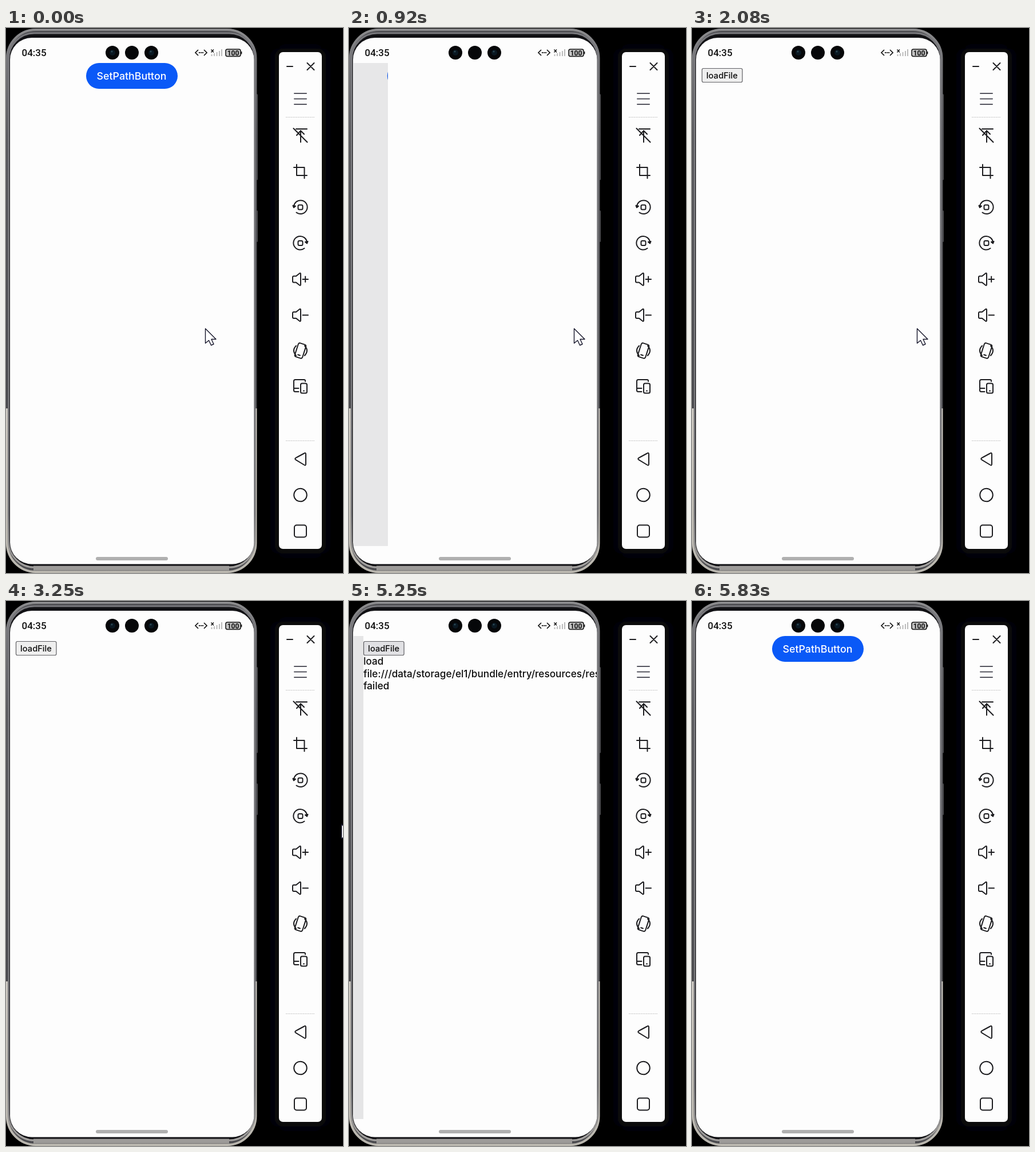
Animation, 589 px wide and 950 px high, one loop 5910 ms. Source, as an HTML page:

```html
<!DOCTYPE html>
<html lang="en">
<head>
<meta charset="utf-8">
<title>Phone page navigation</title>
<style>
  html, body { margin: 0; width: 100%; height: 100%; overflow: hidden; background: #000; }
  svg { display: block; width: 589px; height: 950px; }
  .ui { font-family: Inter, "Noto Sans", sans-serif; }
  .icons { fill: none; stroke: #1d1d20; stroke-width: 2; stroke-linejoin: round; stroke-linecap: round; }
  .status { font-family: Roboto, Inter, sans-serif; font-weight: 500; fill: #111; }
</style>
</head>
<body>
<svg viewBox="0 0 589 950" xmlns="http://www.w3.org/2000/svg">
  <defs>
    <clipPath id="pageArea"><rect x="8" y="61" width="425" height="842"/></clipPath>
    <filter id="soft" x="-50%" y="-10%" width="200%" height="120%"><feGaussianBlur stdDeviation="12"/></filter>
    <linearGradient id="rim" x1="0" y1="0" x2="0" y2="1">
      <stop offset="0" stop-color="#8b8b8d"/>
      <stop offset=".05" stop-color="#77777a"/>
      <stop offset=".2" stop-color="#58585c"/>
      <stop offset=".698" stop-color="#47474b"/>
      <stop offset=".699" stop-color="#cdc9c2"/>
      <stop offset="1" stop-color="#b9b6ae"/>
    </linearGradient>
    <linearGradient id="bezel" x1="0" y1="0" x2="0" y2="1">
      <stop offset="0" stop-color="#77777b"/>
      <stop offset=".9" stop-color="#707073"/>
      <stop offset="1" stop-color="#a3a19f"/>
    </linearGradient>
  </defs>
  <rect width="589" height="950" fill="#000"/>

  <!-- phone body -->
  <g fill="#4a4a4d">
    <rect x="436" y="115" width="4" height="150" rx="1.5"/>
    <rect x="436" y="318" width="4" height="55" rx="1.5"/>
  </g>
  <rect x="0" y="1" width="438" height="949" rx="52" fill="#4c4c50"/>
  <rect x="2" y="3" width="434.500" height="945" rx="50" fill="none" stroke="url(#rim)" stroke-width="4"/>
  <rect x="4.500" y="9" width="430.500" height="931" rx="45" fill="#111114" stroke="url(#bezel)" stroke-width="3"/>
  <path d="M48 941.500H390" stroke="#9d9b99" stroke-width="8"/>
  <rect x="7" y="17" width="426.500" height="917.500" rx="38" fill="#fdfdfd"/>

  <!-- status bar -->
  <g class="status">
    <text x="27.500" y="48.500" font-size="17">04:35</text>
    <g fill="none" stroke="#111" stroke-width="1.7">
      <path d="M336 38l-5 5 5 5M346 38l5 5-5 5"/>
      <path d="M337 43h8" stroke-width="2" stroke-dasharray="2 1"/>
      <path d="M358.500 37.500l4.500 5M363 37.500l-4.500 5" stroke-width="1.4"/>
      <path d="M359.500 49v-3M364 49v-5M368.500 49v-7M373 49v-9M377 49v-12" stroke="#bcbcbc" stroke-width="2"/>
      <rect x="384" y="37" width="26" height="12.500" rx="3" fill="#c4c4c4" stroke-width="1.500"/>
      <path d="M411.500 41v4.500"/>
    </g>
    <text x="397" y="47.500" font-size="12" text-anchor="middle" font-weight="700">100</text>
  </g>
  <g id="lenses"></g>

  <!-- app pages -->
  <g clip-path="url(#pageArea)" class="ui">
    <g id="home">
      <rect x="140" y="61" width="160" height="45" rx="22.500" fill="#0a59f7"/>
      <text x="219.500" y="90" font-size="17.800" font-weight="500" text-anchor="middle" fill="#fff">SetPathButton</text>
    </g>
    <rect id="dim" x="8" y="61" width="425" height="842" fill="#00000c"/>
    <g id="web">
      <rect x="8" y="61" width="426" height="842" fill="#fdfdfd"/>
      <g id="content" fill="#0c0c0c" font-weight="500">
        <rect id="load" x="17.500" y="70.500" width="70.500" height="24" rx="2.500" stroke="#606064" stroke-width="1.200"/>
        <text x="52.500" y="88" font-size="14.700" text-anchor="middle">loadFile</text>
        <g id="result" font-size="17.200">
          <text x="17" y="111">load</text>
          <text x="17" y="132.500">file:///data/storage/el1/bundle/entry/resources/resfile/local.html</text>
          <text x="17" y="154">failed</text>
        </g>
      </g>
      <rect id="bar" x="8" y="894" width="338" height="5" rx="2.500" fill="#9e9e9e"/>
    </g>
  </g>
  <rect x="157" y="922" width="126" height="6" rx="3" fill="#b0b0b0"/>

  <!-- tool strip -->
  <rect x="470" y="36" width="89" height="880" rx="14" fill="#111119" filter="url(#soft)"/>
  <rect x="477" y="42" width="75" height="866" rx="7" fill="#fdfdfd"/>
  <path d="M489 155.500H539M489 719.500H539" stroke="#c6c6c6" stroke-dasharray="2 1"/>
  <g class="icons">
    <path d="M491 67h10M526.500 61l12 12M538.500 61l-12 12"/>
    <path d="M504 114h21M504 123.500h21M504 133h21" stroke="#55555f"/>
    <path d="M507 176h19M515 179v20M508 187l7-8 6 6M502.500 175l24 24"/>
    <path d="M508 238v19h18M503 243h18.500v19"/>
    <g id="turn">
      <path d="M503 312a11.800 11.800 0 1 1 4.500 9.500"/>
      <path d="M501.500 309.500l1.500 3.500 3-2.500z" fill="#1d1d20"/>
      <rect x="510.500" y="308.500" width="8" height="8" rx="2"/>
    </g>
    <use href="#turn" transform="translate(1029 62.500) scale(-1 1)"/>
    <g id="speaker">
      <path d="M501 434.500q0-2 2-2h4l6-4.800q2-1 2 1v18.600q0 2-2 1l-6-4.800h-4q-2 0-2-2z"/>
      <path d="M518.500 438h9.500"/>
    </g>
    <use href="#speaker" y="62.500"/>
    <path d="M523.200 433.200v9.600"/>
    <g transform="rotate(18 514.500 562.500)">
      <rect x="507.500" y="550" width="14" height="25" rx="3"/>
      <path d="M512.500 570.500h4"/>
    </g>
    <path d="M507 554q-8 8 0 17M522 554q8 8 0 17"/>
    <path d="M523 616v-1q0-2-2-2h-15.500q-2.500 0-2.500 2.500v16q0 2.500 2.500 2.500h6M504 628h7.500"/>
    <rect x="515" y="619.500" width="11" height="17" rx="2.500"/>
    <path d="M520 632.500h1"/>
    <path d="M521 741.500q3-1.800 3 1.500v17q0 3.300-3 1.500l-14.500-8.800q-2.500-1.700 0-3.400z"/>
    <circle cx="514.500" cy="814" r="11.300"/>
    <rect x="504" y="866.500" width="21" height="21" rx="4"/>
  </g>

  <path id="cursor" d="M0 0v25.500l6-5 4 8.500 4.500-2-4-8.500h8z" fill="#fff" stroke="#15152a" stroke-width="1.400" stroke-linejoin="round"/>
</svg>

<script>
const $ = id => document.getElementById(id);
const LOOP = 5910, STEPS = 71, FPS = 12, WIDTH = 426;
const PUSH = 730, POP = 5233, READY = 1160, RESULT = 3830;

$('lenses').innerHTML = [186, 220, 254].map((x, i) =>
  `<circle cx="${x}" cy="43" r="12" fill="#060709"/>` +
  (i === 1 ? '' : `<circle cx="${x}" cy="43" r="5" fill="#0a1822"/><circle cx="${x - 1}" cy="41" r="1.500" fill="#2d4a56"/>`)
).join('');

const clamp = v => Math.max(0, Math.min(1, v));
const ramp = (t, a, b) => clamp((t - a) / (b - a));
const ease = v => v * v * (3 - 2 * v);
const mix = (a, b, v) => a + (b - a) * v;
const show = (id, on) => $(id).setAttribute('visibility', on ? 'inherit' : 'hidden');
const move = (id, x, y = 0) => $(id).setAttribute('transform', `translate(${x.toFixed(2)} ${y.toFixed(2)})`);

// critically damped page spring
function spring(ms) {
  if (ms <= 0) return 0;
  const x = ms * 0.0185;
  return 1 - (1 + x) * Math.exp(-x);
}

function draw(t) {
  const open = t < POP ? spring(t - PUSH) : 1 - spring(t - POP);
  const shown = open > 0.002;
  move('home', -0.2 * WIDTH * open);
  $('dim').setAttribute('opacity', shown ? 0.1 * open : 0);
  move('web', (1 - open) * WIDTH);
  show('web', shown);

  show('content', shown && t >= READY);
  show('result', shown && t >= RESULT);
  $('load').setAttribute('fill', t < RESULT - 160 ? '#efefef' : '#e1e1e4');
  move('content', -9 * ease(ramp(t, 5080, 5240)));
  $('bar').setAttribute('opacity', t < RESULT ? 0 : 1 - ramp(t, 4250, 4600));

  const drift = ease(ramp(t, 80, 420));
  const exit = ease(ramp(t, 2700, 3240));
  move('cursor', mix(mix(348.5, 393.5, drift), 586.5, exit), mix(524, 389, exit));
  show('cursor', t < 4070);
}

function tick(now) {
  const step = Math.floor((now % LOOP) * STEPS / LOOP);
  draw(step * 1000 / FPS);
  requestAnimationFrame(tick);
}
draw(0);
requestAnimationFrame(tick);
</script>
</body>
</html>
```
